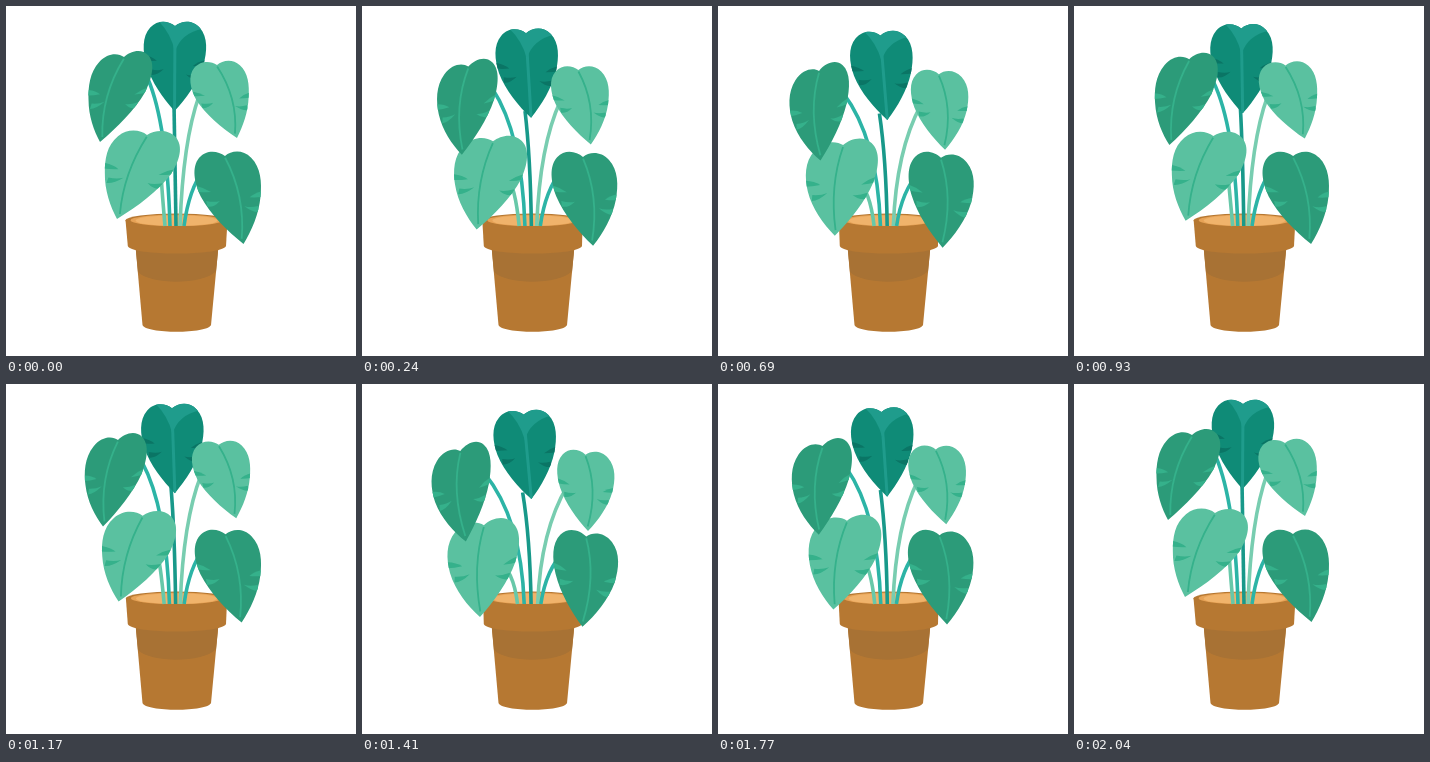
Animation, 350 px wide and 350 px high, one loop 3000 ms. Source, as an HTML page with a canvas:

```html
<!DOCTYPE html>
<html lang="en">
<head>
<meta charset="utf-8">
<title>Swaying plant</title>
<style>
  html, body { margin: 0; width: 100%; height: 100%; overflow: hidden; background: #fff; }
  canvas { display: block; width: 350px; height: 350px; }
</style>
</head>
<body>
<canvas id="stage" width="350" height="350"></canvas>
<script>
const ctx = document.getElementById('stage').getContext('2d');
const LOOP = 3000, SWAY = 1020, TICK = 30;
const GREEN = '#2c9b79', MINT = '#5ac1a0', VEIN = '#35b18b', TEAL = '#2cb4a6';
const CLAY = '#b67832', CLAY_DARK = '#a87234';

// rest and far hold notch x, y and tip x, y; a higher ease lingers longer at rest.
// stem: start relative to the notch, curve handle relative to base x and start y.
const leaves = [
  { rest: [169, 20, 168.5, 105], far: [161, 31.5, 169.5, 116], ease: 1.2,
    half: 31, tilt: 0, bow: 0, fill: '#0f8b77', vein: '#1f9c8c', mark: '#0a7565',
    stem: { from: [-1, 78], via: [-1, 45], base: 170, drift: -1, color: '#18998a' } },
  { rest: [211, 59, 231, 132], far: [226, 73, 225, 150], ease: 2.6,
    half: 28.5, tilt: 6, bow: 6, fill: MINT, vein: VEIN, mark: VEIN,
    stem: { from: [-18, 31], via: [3, 45], base: 174, drift: 2, color: '#78cdb0' } },
  { rest: [141, 129, 111, 213], far: [119, 143, 119, 236], ease: 2,
    half: 36, tilt: -11, bow: -5, fill: MINT, vein: VEIN, mark: VEIN,
    stem: { from: [14, 35], via: [-4, 10], base: 159, drift: -4, color: '#67c8a9' } },
  { rest: [118, 51, 94, 136], far: [96, 69, 105, 160], ease: 1.6,
    half: 31, tilt: -17, bow: -6, fill: GREEN, vein: VEIN, mark: VEIN,
    stem: { from: [24, 22], via: [-3, 45], base: 164, drift: -2, color: TEAL } },
  { rest: [219, 150, 237.5, 238], far: [225.5, 153, 216.5, 244], ease: 3,
    half: 32.5, tilt: 7, bow: 6, fill: GREEN, vein: VEIN, mark: VEIN,
    stem: { from: [-21, 13], via: [5, 20], base: 178, drift: 1, color: TEAL } }
];

// two swings, then rest
function swing(time, ease) {
  if (time >= 2 * SWAY) return 0;
  return Math.sin(Math.PI * (time % SWAY) / SWAY) ** ease;
}

// maps leaf units (half width, length) to the stage
function leafMap(leaf, [nx, ny, tx, ty]) {
  const dx = tx - nx, dy = ty - ny, lean = Math.atan2(-dx, dy);
  const q = lean * .6 + leaf.tilt * Math.PI / 180;
  return (x, y, bend = lean * 14) => [
    nx + leaf.half * x * Math.cos(q) + dx * y + bend * 4 * y * (1 - y),
    ny + leaf.half * x * Math.sin(q) + dy * y
  ];
}

function stroke(color, width) {
  ctx.strokeStyle = color;
  ctx.lineWidth = width;
  ctx.stroke();
}

function drawLeaf(leaf, pose) {
  const map = leafMap(leaf, pose);
  const move = (x, y) => ctx.moveTo(...map(x, y));
  const quad = (a, b, x, y) => ctx.quadraticCurveTo(...map(a, b), ...map(x, y));
  const cubic = (a, b, c, d, x, y) =>
    ctx.bezierCurveTo(...map(a, b), ...map(c, d), ...map(x, y));

  ctx.save();
  ctx.beginPath();
  for (const s of [-1, 1]) {
    move(0, 0);
    cubic(s * .2, -.06, s * .55, -.08, s * .8, .02);
    cubic(s * 1.07, .13, s * 1.04, .3, s * .92, .46);
    cubic(s * .75, .66, s * .38, .85, 0, 1);
  }
  ctx.fillStyle = leaf.fill;
  ctx.fill();
  ctx.clip();

  // slits along both edges
  ctx.fillStyle = leaf.mark;
  for (const s of [-1, 1]) for (const row of [0, 1]) {
    const edge = s * (1 - .22 * row), y = .4 + .17 * row + .03 * s;
    ctx.beginPath();
    move(edge, y - .03);
    quad(edge - s * .25, y - .01, edge - s * .42, y + .04 - .07 * row);
    quad(edge - s * .2, y + .045, edge, y + .035);
    ctx.fill();
  }

  ctx.beginPath();
  move(0, .02);
  ctx.quadraticCurveTo(...map(0, .45, leaf.bow * 2), ...map(0, leaf.bow ? .94 : 1));
  stroke(leaf.vein, leaf.bow ? 1.8 : 3);

  // light crown of the upright leaf
  if (!leaf.bow) {
    ctx.beginPath();
    move(-.65, -.1);
    quad(-.15, .06, 0, .3);
    quad(.2, .08, .9, .03);
    quad(.5, -.1, 0, -.1);
    ctx.fillStyle = leaf.vein;
    ctx.fill();
  }
  ctx.restore();
}

function drawStem({ from, via, base, drift, color }, [nx, ny], sway) {
  const x = nx + from[0], y = ny + from[1], end = base + drift * sway;
  ctx.beginPath();
  ctx.moveTo(x, y);
  ctx.quadraticCurveTo(end + via[0], y + via[1], end, 220);
  stroke(color, 3.6);
}

function fillPath(d, color) {
  ctx.fillStyle = color;
  ctx.fill(new Path2D(d));
}

function ellipse(y, rx, ry, color) {
  ctx.beginPath();
  ctx.ellipse(170.5, y, rx, ry, 0, 0, 7);
  ctx.fillStyle = color;
  ctx.fill();
}

function drawPot(squeeze) {
  const in2 = 1.8 * squeeze, l = 119.5 + in2, r = 221.5 - in2;
  fillPath('M129.5 240L136.5 319C139 328 202 328 205 319L212.5 240Z', CLAY);
  fillPath('M129.5 240L132 266C144 279 198 279 210 265L212.5 240Z', CLAY_DARK);
  fillPath(`M${l} 214L121.8 240C125 250 216 250 220 240L${r} 214Z`, CLAY);
  ellipse(214.5, 51 - in2, 7, CLAY);
  ellipse(214.3, 46 - in2, 5.8, '#e6a256');
  ellipse(214.6, 41 - in2, 5.3, '#f0b36b');
}

function draw(time) {
  ctx.fillStyle = '#fff';
  ctx.fillRect(0, 0, 350, 350);
  drawPot(swing(time, 2));

  const posed = leaves.map(leaf => {
    const sway = swing(time, leaf.ease);
    return { leaf, sway, pose: leaf.rest.map((v, i) => v + (leaf.far[i] - v) * sway) };
  });
  for (const { leaf, pose, sway } of posed) drawStem(leaf.stem, pose, sway);
  for (const { leaf, pose } of posed) drawLeaf(leaf, pose);
}

const start = performance.now();
function frame() {
  const t = (performance.now() - start) % LOOP;
  draw(Math.floor(t / TICK) * TICK);
  requestAnimationFrame(frame);
}
frame();
</script>
</body>
</html>
```
